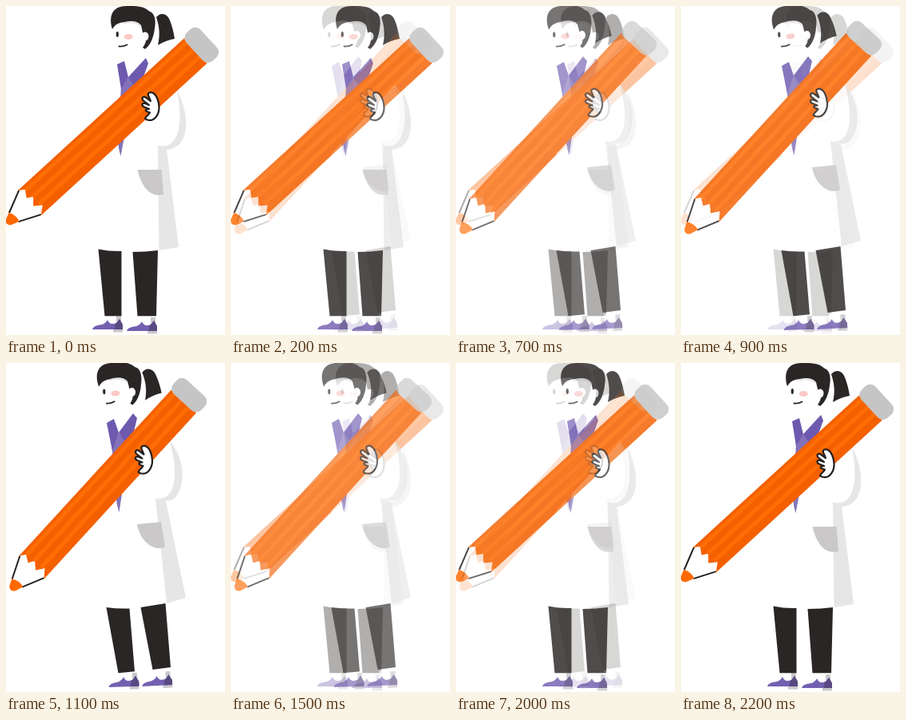
These frames come from a looping animation (274 by 412 pixels, 2300 ms). An HTML page:

```html
<!DOCTYPE html>
<html lang="en">
<head>
<meta charset="utf-8">
<title>Scientist with a pencil</title>
<style>
  html, body { margin: 0; width: 100%; height: 100%; overflow: hidden; background: #fff; }
  svg { display: block; width: 100vw; height: 100vh; }
</style>
</head>
<body>
<svg viewBox="0 0 274 412">
  <defs>
    <g id="head">
      <path fill="#fff" d="M137 20H176V50L170 76L153 89L148 66Q136 62 137 48Z"/>
      <path fill="#2a2625" d="M188 14C194 7 202 10 205 18Q209 28 211 41Q200 43 190 49C193 36 192 26 188 14Z"/>
      <path fill="none" stroke="#e6e6e6" stroke-width="5" d="M146 20C156 18 164 18 169 24"/>
      <path fill="#2a2625" d="M133 29C129 17 131 4 143 1C153-1 166 0 172 2C177 4 178 6 180 7C186 9 188 18 186 28C185 38 181 49 174 54L171 52Q175 47 175 42L171 33L169 24C163 17 154 19 148 20C142 21 137 22 133 29Z"/>
      <ellipse cx="174" cy="38" rx="4.5" ry="5.5" fill="#fff"/>
      <ellipse cx="139.3" cy="35.5" rx="1.6" ry="3.4" fill="#2a2625"/>
      <ellipse cx="153.3" cy="38.5" rx="5.6" ry="3.5" fill="#fac9c5"/>
      <path fill="none" stroke="#2a2625" stroke-width="1.8" stroke-linecap="round" d="M141.500 50.500Q147 51 151.500 48.500"/>
    </g>
    <!-- Lies along the x axis, sharpened end at the origin -->
    <g id="pencil">
      <path fill="#fff" d="M0-21L-28-8L-39 0L-27 8L0 21H12V-21Z"/>
      <path fill="none" stroke="#231f20" stroke-width="2" d="M0-20.500L-28-8M-27 8L0 20.500"/>
      <path fill="#ff6900" d="M-28-8.500Q-23 0-26 8.500L-36 5Q-42 1-37-4.500Z"/>
      <path fill="#f46000" d="M-1-21.300L6.500-16L.5-7L8-2.500L0 6.200L9.500 13L-1 21.300H281V-21.300Z"/>
      <path stroke="#ff6d05" stroke-width="5" d="M6-15H280M7-3H280M7 9H280"/>
      <rect x="279.500" y="-24.300" width="24" height="48" rx="9" fill="#c5c5c5"/>
    </g>
    <path id="hand" fill="#fff" stroke="#231f20" stroke-width="2.200" stroke-linejoin="round"
      d="M179 143C187 144 192 134 191.500 126C191 118 188 111 184 109C180 107 177 109 178 112L181 119L175 114.500C171 112 169 116 172 118.500L179 124L174 122C170 121 169 125 173 126.500L179 129C176 129 173 130 176 132L180 133.500C178 137 175 138 174 141Q176 143 179 143Z"/>
    <g id="shoe">
      <path fill="#fff" d="M16-5H35V8H16Z"/>
      <path fill="#c9c7cb" d="M30-3H36V4H30ZM26 14H38V17.500H26Z"/>
      <path fill="#7360b1" d="M0 14Q1 9 12 8Q17 6 19 2Q21 7 25 7Q31 7 34 1L38 8V14Z"/>
      <path fill="#594982" d="M30 6L34 1L38 8V14H28Q27 9 30 6Z"/>
    </g>
  </defs>
  <g id="upright"></g>
  <g id="leaning"></g>
</svg>
<script>
const upright = {
  head: 'translate(0 0)',
  pencil: 'translate(30 246) rotate(-42.5)',
  hand: 'translate(0 0)',
  shoes: ['translate(108 391)', 'translate(151 393)'],
  pants: 'M115.500 304.500Q130 307.500 144.500 307V388.300H123.500ZM158.500 308Q175 308 190 306L188 388.300H164.500Z',
  body: 'M139 73L153 89L177 69Q203 75 215 106C226 138 222 176 201 180L192 303H116Z',
  skirt: 'M190 174L201 180L216 302L191.500 306Z',
  sleeve: 'M214 106C229 132 233 178 201 180L191 175C217 180 222 146 214 106Z',
  pocket: 'M164.500 205H194.500L197 236C181 240 170 228 164.500 205Z',
  lapels: 'M139 73L148 69L153 89L144 104ZM153 89L175 65L178 72L165 108Z',
  shirt: 'M153 89L164 100L148 164L143.500 188Q139 174 140.500 160L144 101Z'
};
const leaning = {
  head: 'translate(-16 0) rotate(-3 145 45)',
  pencil: 'translate(32.500 255.300) rotate(-47.500)',
  hand: 'translate(-8.500 -4.500)',
  shoes: ['translate(128 392) rotate(-2)', 'translate(169.500 391) rotate(-3)'],
  pants: 'M125.500 306Q140 308 154.500 307.500L161 386.300L140.500 388.300ZM168.500 306L199.500 301L206 381L183.500 384Z',
  body: 'M126 75L141 89L162 66Q192 72 205 98C220 130 219 171 198 174L201 300L126 304Z',
  skirt: 'M187 169L200 173L225 294L201 301Z',
  sleeve: 'M205 98C223 119 226 151 212 168Q206 176 189 170C213 171 216 140 205 98Z',
  pocket: 'M164 202L194 199L199 230C187 237 168 225 164 202Z',
  lapels: 'M126 75L135 70L141 87L133 110ZM141 87L159 63L164 69L155 107Z',
  shirt: 'M141 87L154 102L145 164L141.500 187Q137 174 138 160L132.500 106Z'
};

const path = (d, fill) => `<path d="${d}" fill="${fill}"/>`;
const part = (id, transform) => `<use href="#${id}" transform="${transform}"/>`;

function figure(pose) {
  return pose.shoes.map(place => part('shoe', place)).join('') +
    path(pose.pants, '#2a2625') +
    path(pose.body, '#fff') +
    path(pose.skirt, '#e6e6e6') +
    path(pose.sleeve, '#e6e6e6') +
    path(pose.pocket, '#cac8c8') +
    part('head', pose.head) +
    path(pose.shirt, '#8372ba') +
    path(pose.lapels, '#6d5aaf') +
    part('pencil', pose.pencil) +
    part('hand', pose.hand);
}

const layers = ['upright', 'leaning'].map(id => document.getElementById(id));
layers[0].innerHTML = figure(upright);
layers[1].innerHTML = figure(leaning);

const LOOP = 2300, STEP = 100, FADE_STEPS = 11;
const start = performance.now();

// Both poses fade in equal steps, there and back
function render(now) {
  const step = Math.floor(Math.max(0, now - start) % LOOP / STEP);
  const mix = 1 - Math.abs(step - FADE_STEPS) / FADE_STEPS;
  layers[0].setAttribute('opacity', 1 - mix);
  layers[1].setAttribute('opacity', mix);
  requestAnimationFrame(render);
}
render(start);
</script>
</body>
</html>
```
